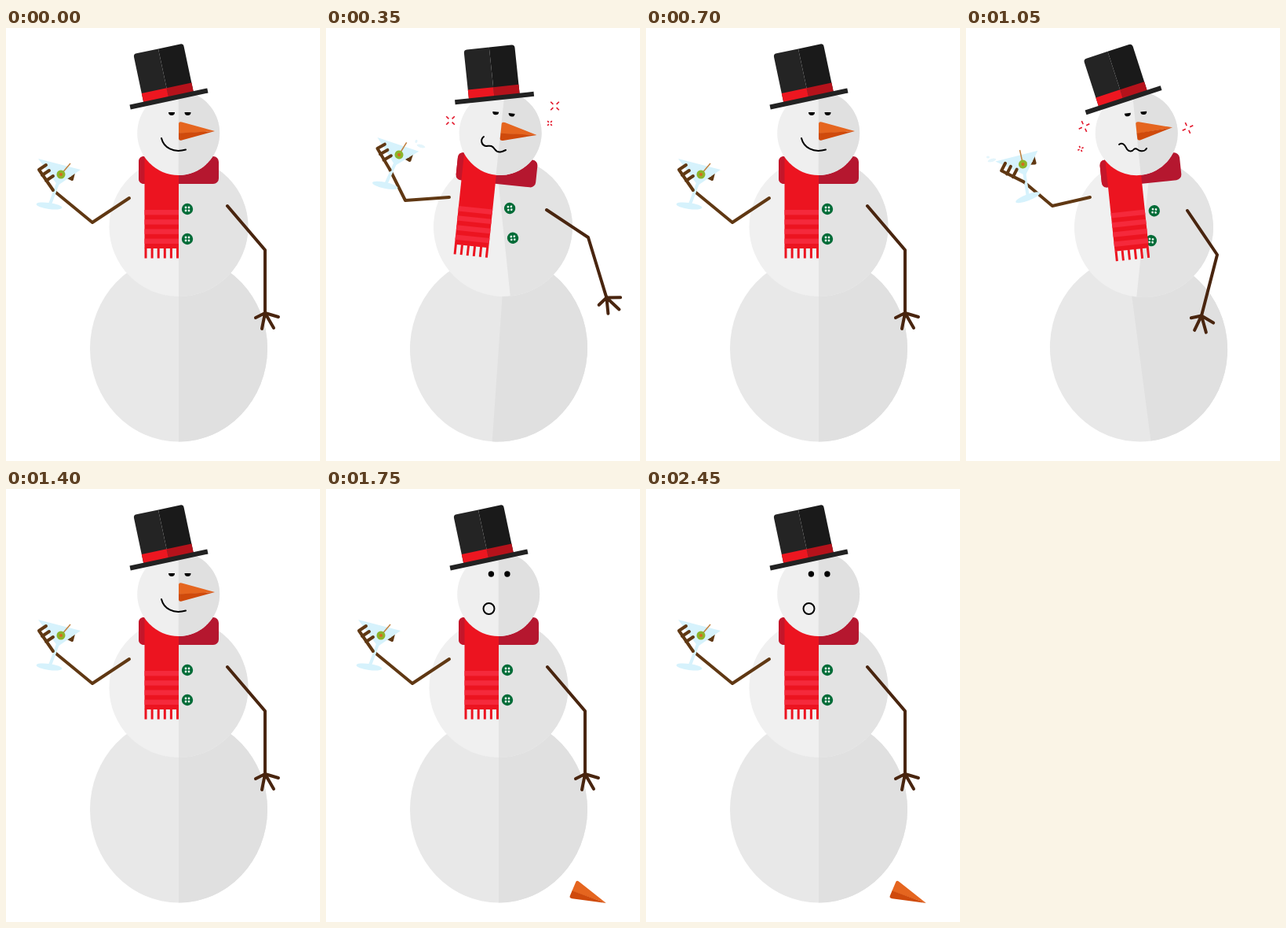
Animation of 400x550 px, one loop 2950 ms. Source, as an HTML page:

```html
<!DOCTYPE html>
<html lang="en">
<head>
<meta charset="utf-8">
<title>Tipsy snowman</title>
<style>
html, body { margin: 0; width: 100%; height: 100%; overflow: hidden; background: #fff; }
svg { display: block; width: 100vw; height: 100vh; }
.line { fill: none; stroke-width: 4; stroke-linecap: round; stroke-linejoin: round; }
.left { stroke: #603813; }
.right { stroke: #49250f; }
.face { fill: none; stroke: #000; stroke-width: 2; stroke-linecap: round; }
.spark { fill: none; stroke: #e3172b; stroke-width: 1.6; }
</style>
</head>
<body>
<svg viewBox="0 0 400 550">
  <g id="base"></g>
  <g id="belly"></g>
  <g id="top">
    <g id="scarf"></g>
    <g id="head"></g>
    <g id="eyes"></g>
    <g id="hat" transform="translate(207.5 90) rotate(-12)">
      <path d="M-32.5 0V-61q0-4 4-4H0V0z" fill="#242424"/>
      <path d="M32.5 0V-61q0-4-4-4H0V0z" fill="#1a1a1a"/>
      <path d="M-32.5-14H0V0H-32.5z" fill="#ed1620"/>
      <path d="M0-14H32.5V0H0z" fill="#b5121b"/>
      <path d="M-50.5-3H50.5V3H-50.5z" fill="#222"/>
    </g>
  </g>
  <path id="mouth" class="face"/>
  <g id="nose">
    <path d="M0 0V-9.5Q0-12.500 4-11.500L46 0 0 3z" fill="#e5651f"/>
    <path d="M0 2.500V9.500Q0 12.500 4 11.500L46 0z" fill="#cf4a0c"/>
  </g>
  <path id="armL" class="line left"/>
  <g id="hand">
    <path class="line left" d="M8 3L14 6 16-2"/>
    <path d="M-29-20L25-6-4 14z" fill="#d6f2fc"/>
    <path d="M-4 11L-14 38" stroke="#d6f2fc" stroke-width="4"/>
    <ellipse cx="-15" cy="40" rx="16.500" ry="4" transform="rotate(8 -15 40)" fill="#d6f2fc"/>
    <path id="pick" d="M0 0L12-14" stroke="#c0803f" stroke-width="1.500"/>
    <circle r="5.500" fill="#8cb52b"/>
    <circle r="2" fill="#d8691f"/>
    <path class="line left" d="M-10 20L-28-6-19-12M-24 1L-15-5M-19 8L-10 2"/>
  </g>
  <path id="armR" class="line right"/>
  <path id="fingers" class="line right" d="M0 79V80L-12 86M0 80L-4 100M0 80L11 99M0 80L17 85"/>
  <g id="extras"></g>
</svg>
<script>
const $ = id => document.getElementById(id);
const set = (id, attrs) => { for (const k in attrs) $(id).setAttribute(k, attrs[k]); };
const rot = (a, x, y) => `rotate(${a} ${x} ${y})`;

function ball(cx, cy, rx, ry, light, dark) {
  return `<ellipse cx="${cx}" cy="${cy}" rx="${rx}" ry="${ry}" fill="${light}"/>` +
    `<path d="M${cx} ${cy - ry}A${rx} ${ry} 0 0 1 ${cx} ${cy + ry}z" fill="${dark}"/>`;
}

function button(y) {
  let s = `<circle cx="231" cy="${y}" r="7.2" fill="#006b37"/>`;
  for (const dx of [-2, 2]) for (const dy of [-2, 2])
    s += `<circle cx="${231 + dx}" cy="${y + dy}" r="1.4" fill="#e8f0ea"/>`;
  return s;
}

function scarf() {
  const rect = (x, y, w, h, fill) => `<rect x="${x}" y="${y}" width="${w}" height="${h}" fill="${fill}"/>`;
  let s = '<rect x="169" y="163" width="102" height="35" rx="7" fill="#b5172f"/>' +
    '<path d="M190 163H176q-7 0-7 7V191q0 7 7 7H190z" fill="#c4162a"/>' +
    rect(176.5, 163, 43.5, 117, '#ec1420');
  for (let i = 0; i < 4; i++) s += rect(176.5, 231 + i * 12.2, 43.5, 6.4, '#f5293b');
  for (let i = 0; i < 6; i++) s += rect(176.5 + i * 8.1, 279.5, 3, 13, '#ec1420');
  return s;
}

const spark = (x, y, r, a) => {
  const d = [0, 1, 2, 3].map(i => {
    const t = Math.PI * (i / 2 + .25);
    const at = k => `${k * Math.cos(t)} ${k * Math.sin(t)}`;
    return `M${at(r * .4)}L${at(r)}`;
  }).join('');
  return `<path class="spark" d="${d}" transform="translate(${x} ${y}) rotate(${a})"/>`;
};
const drop = (x, y, rx, ry, a) =>
  `<ellipse cx="${x}" cy="${y}" rx="${rx}" ry="${ry}" fill="#e4f5fb" transform="${rot(a, x, y)}"/>`;

const eyeX = [211, 231.5];
const eyes = {
  sleepy: eyeX.map(x => `<path d="M${x - 4} 107h8a4 4 0 0 1-8 0z"/>`).join(''),
  open: eyeX.map(x => `<circle cx="${x - .6}" cy="108" r="3.7"/>`).join(''),
  shut: eyeX.map(x => `<path class="face" d="M${x - 4.5} 108h8"/>`).join('')
};

const calm = {
  tilt: 0, base: 0, belly: [0, 0, 0],
  hand: [70, 186, 0], pick: 0, armL: [157, 216, 110, 247],
  armR: [282, 226, 330, 282, 0],
  mouth: 'M198 140C201 152 213 159 229 154.500', eyes: 'sleepy', extras: ''
};
const swayRight = {
  ...calm, tilt: 6, base: 4, belly: [5.5, 0, -6],
  hand: [93, 161, 4], pick: -13, armL: [157, 215, 101, 219],
  armR: [281, 231, 334, 266, -17],
  mouth: 'M201 138C196 142 198 149 204 150C208 150 211 148 215 154C219 160 225 157 229 155',
  extras: spark(158.5, 117.5, 7.5, 0) + spark(291.5, 99, 7.5, 0) + spark(285, 121, 4, 0) +
    drop(115, 144, 1.5, 2, 20) + drop(121, 150, 5.5, 2, 15)
};
const swayLeft = {
  ...calm, tilt: -6, base: -7.5, belly: [6.5, 1, 6],
  hand: [72.5, 173, -29], pick: -24, armL: [158, 215, 110, 226],
  armR: [282, 232, 320, 288, 14.5],
  mouth: 'M195 148C199 145 202 148 204 152C206 157 211 158 214 154C217 151 219 156 222 156C226 157 229 155 230 153',
  extras: spark(150.5, 125, 7.5, 20) + spark(282.5, 127, 7.5, 20) + spark(146, 153.5, 4, 20) +
    drop(28, 164, 2, 1.5, 0) + drop(33, 168, 5.5, 2, -15)
};
const shock = { ...calm, mouth: 'M200.500 152a7 7 0 1 0 14 0a7 7 0 1 0-14 0', eyes: 'open', fallen: true };
const blink = { ...shock, eyes: 'shut' };

const LOOP = 2950;
const steps = [[350, calm], [700, swayRight], [1050, calm], [1400, swayLeft],
  [1750, calm], [2250, shock], [2450, blink], [LOOP, shock]];

function draw(p) {
  const lean = rot(p.tilt, 220, 157);
  const [bx, by, ba] = p.belly, [hx, hy, ha] = p.hand, [sx, sy, ex, ey, ra] = p.armR;
  const [lx, ly, mx, my] = p.armL;
  const t = ha * Math.PI / 180;
  const wx = hx - 10 * Math.cos(t) - 20 * Math.sin(t);
  const wy = hy - 10 * Math.sin(t) + 20 * Math.cos(t);
  set('base', { transform: rot(p.base, 220, 407) });
  set('belly', { transform: `translate(${bx} ${by}) ${rot(ba, 220, 252.5)}` });
  set('top', { transform: lean });
  set('mouth', { d: p.mouth });
  set('nose', { transform: p.fallen ? 'translate(314.500 508) rotate(23)' : lean + ' translate(220 131)' });
  set('hand', { transform: `translate(${hx} ${hy}) rotate(${ha})` });
  set('pick', { transform: `rotate(${p.pick})` });
  set('armL', { d: `M${lx} ${ly}L${mx} ${my} ${wx} ${wy}` });
  const f = ra * Math.PI / 180;
  set('armR', { d: `M${sx} ${sy}L${ex} ${ey} ${ex - 79 * Math.sin(f)} ${ey + 79 * Math.cos(f)}` });
  set('fingers', { transform: `translate(${ex} ${ey}) rotate(${ra})` });
  $('eyes').innerHTML = eyes[p.eyes];
  $('extras').innerHTML = p.extras;
}

$('base').innerHTML = ball(220, 407, 113, 118.5, '#e8e8e8', '#e0e0e0');
$('belly').innerHTML = ball(220, 252.5, 88.5, 88.5, '#f0f0f0', '#e3e3e3') + button(230) + button(268);
$('scarf').innerHTML = scarf();
$('head').innerHTML = ball(219.7, 133.5, 52.5, 53.5, '#efefef', '#e0e0e0');

let shown;
const start = performance.now();
function tick() {
  const t = (performance.now() - start) % LOOP;
  const pose = steps.find(s => t < s[0])[1];
  if (pose !== shown) draw(shown = pose);
  requestAnimationFrame(tick);
}
tick();
</script>
</body>
</html>
```
